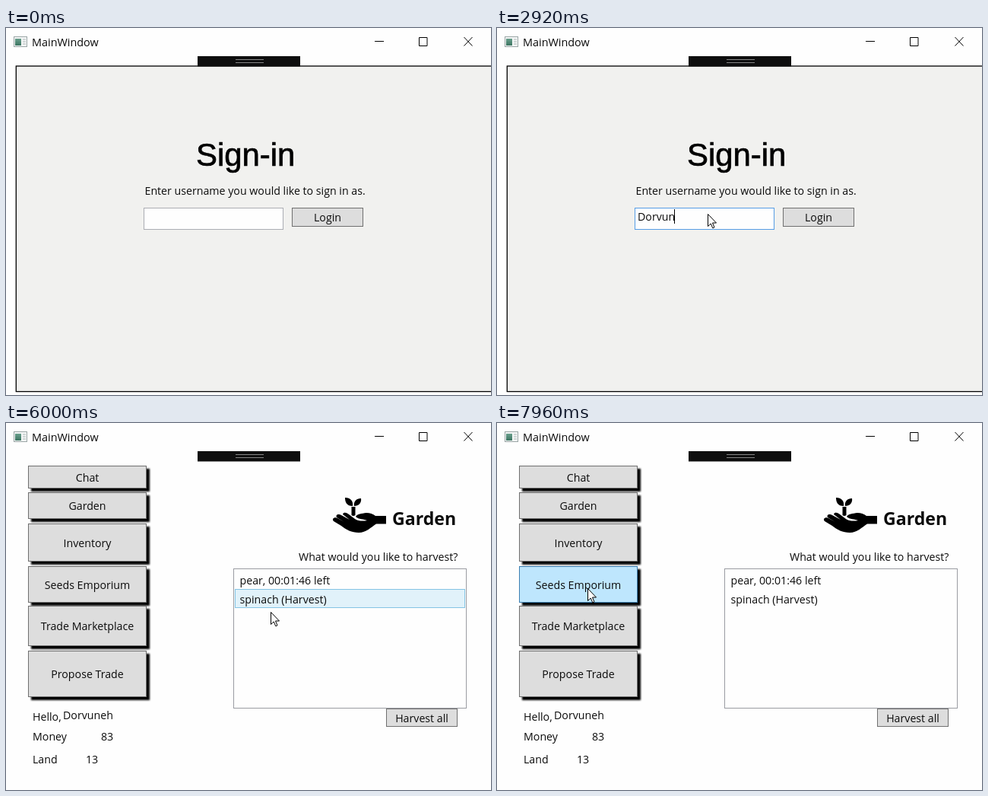
Animation of 638x482 px, one loop 8 s. Source, as an HTML page:

```html
<!DOCTYPE html>
<html lang="en">
<head>
<meta charset="utf-8">
<title>MainWindow</title>
<style>
html, body { margin: 0; width: 100%; height: 100%; overflow: hidden; background: #fefefe; }
svg { display: block; width: 638px; height: 482px; }
text { font: 14.2px "Open Sans", "Noto Sans", sans-serif; fill: #0c0c0c; white-space: pre; }
.mid { text-anchor: middle; }
.button { fill: #ddd; stroke: #707070; }
.button.hover { fill: #bee6fd; stroke: #3c7fb1; }
.row { fill: none; }
.row.hover { fill: #e1f2fa; stroke: #84c4e4; }
</style>
</head>
<body>
<svg viewBox="0 0 638 482">
  <defs>
    <filter id="shadow" x="-10%" y="-20%" width="120%" height="150%">
      <feDropShadow dx="4" dy="4" stdDeviation="1.3" flood-color="#000" flood-opacity="1"/>
    </filter>
    <linearGradient id="pane" x2="0" y2="1">
      <stop stop-color="#699f8c"/><stop offset="1" stop-color="#3d7562"/>
    </linearGradient>
  </defs>
  <rect width="638" height="482" fill="#fefefe"/>

  <g id="signIn">
    <rect x="13.3" y="50" width="640" height="427.5" fill="#f1f1ef" stroke="#000" stroke-width="1.3"/>
    <text x="250" y="181" style="font: 41.9px 'Liberation Sans', Arial, sans-serif; fill: #000; stroke: #000; stroke-width: .7">Sign-in</text>
    <text x="182.500" y="219">Enter username you would like to sign in as.</text>
    <rect id="field" x="181.5" y="236.5" width="183" height="28" fill="#fefefe"/>
    <text id="typed" x="185" y="253"></text>
    <path id="caret" d="M0 238V257" stroke="#000"/>
  </g>

  <g id="garden">
    <text x="35" y="391">Hello,</text><text id="userName" x="75" y="389"></text>
    <text x="35" y="417">Money</text><text x="125" y="417">83</text>
    <text x="35" y="447">Land</text><text x="105" y="447">13</text>
    <path d="M486 122H500V132.500H487C480 137 474 144 464 144C455 144 447 140 441 135L431 129C428 126 432 123 436 125L445 130L435 124C433 120 438 119 441 121L452 127L443 120C444 116 449 118 451 120L459 126C463 129 470 129 475 128C471 126 464 127 460 123C462 119 468 119 474 118Q481 118 486 122Z"/>
    <path d="M454.500 110H459.500V121Q457 123 454.500 121ZM456 109C448 109 446 104 446 98C453 98 457 102 456 109ZM458 109C457 103 461 99 467 99C468 105 464 109 458 109Z"/>
    <text x="508" y="134" style="font-size: 23.1px; font-weight: 700">Garden</text>
    <text x="385" y="181">What would you like to harvest?</text>
    <rect x="299.500" y="191.500" width="306" height="183" fill="#fefefe" stroke="#9a9ca2"/>
  </g>

  <g id="title">
    <rect x="10.500" y="11.500" width="17" height="13" fill="#f4f6f6" stroke="#9aa5a5"/>
    <rect x="12" y="14" width="8" height="9" fill="url(#pane)"/>
    <path d="M22 15h4M22 18h4M22 21h4" stroke="#aab5b5"/>
    <text x="34" y="24" style="font-size: 14.4px">MainWindow</text>
    <path d="M485 17.500h12M543.500 12.500h10.500v11h-10.500zM602.500 12l11 11.500m0-11.500l-11 11.500" fill="none" stroke="#000"/>
    <rect x="252" y="37" width="135" height="13.500" fill="#0e0e0e"/>
    <path d="M302 41.500h37M302 45.500h37" stroke="#868686"/>
  </g>

  <path id="arrow" d="M.5 .5V16.500L4.200 13L6.800 18.800L9 17.800L6.500 12H11.500Z" fill="#fefefe" stroke="#000"/>
  <path id="beam" d="M-3.500 -9H-1L0 -8L1 -9H3.500M0 -8V8M-3.500 9H-1L0 8L1 9H3.500" fill="none" stroke="#000"/>
</svg>
<script>
const LOOP = 8000, PAGE_CHANGE = 4520, HOVER_LAG = 60, BLINK = 530;
const USER = "Dorvuneh";
const $ = id => document.getElementById(id);

// Time and number of letters in the field
const typing = [[790, 0], [1640, 1], [1920, 2], [2120, 3], [2640, 4], [2920, 6], [3640, 7], [4160, 8]];

// Time, x, y of the pointer
const pointer = [
  [80, 619, 337], [700, 277, 240], [880, 277, 240], [920, 277, 244], [5120, 277, 244],
  [5640, 340, 232], [5920, 344, 235], [6000, 348, 248],
  [6280, 528, 378], [6440, 528, 378], [6760, 290, 263], [6840, 290, 263],
  [7040, 142, 255], [7200, 134, 258], [7640, 123, 237], [7960, 119, 217]
];

const targets = [];

function addTarget(page, cls, x, y, w, h, label, extra = "") {
  const group = document.createElementNS("http://www.w3.org/2000/svg", "g");
  const row = cls === "row";
  group.innerHTML =
    `<rect class="${cls}" x="${x + .5}" y="${y + .5}" width="${w - 1}" height="${h - 1}" ${extra}/>` +
    `<text class="${row ? "" : "mid"}" x="${row ? x + 6.5 : x + w / 2}" y="${y + h / 2 + (row ? 6.5 : 5.5)}">${label}</text>`;
  $(page).append(group);
  targets.push({ page, x, y, w, h, rect: group.firstChild });
}

addTarget("signIn", "button", 376, 236, 94, 25, "Login");
addTarget("garden", "row", 301, 193, 303, 25, "pear, 00:01:46 left");
addTarget("garden", "row", 301, 218, 303, 25, "spinach (Harvest)");
addTarget("garden", "button", 500, 375, 94, 24, "Harvest all");
[["Chat", 56, 30], ["Garden", 91, 35], ["Inventory", 132, 50], ["Seeds Emporium", 188, 48],
 ["Trade Marketplace", 240, 53], ["Propose Trade", 299, 61]].forEach(([label, y, h]) =>
  addTarget("garden", "button", 29, y, 156, h, label, 'filter="url(#shadow)"'));
$("userName").textContent = USER;

function pointerAt(t) {
  if (t < pointer[0][0]) return [-99, -99];
  const next = pointer.findIndex(p => p[0] > t);
  if (next < 0) return pointer.at(-1).slice(1);
  const [t0, x0, y0] = pointer[next - 1], [t1, x1, y1] = pointer[next];
  const u = (t - t0) / (t1 - t0), s = u * u * (3 - 2 * u);
  return [x0 + (x1 - x0) * s, y0 + (y1 - y0) * s];
}

const inside = ([px, py], { x, y, w, h }) => px >= x && px < x + w && py >= y && py < y + h;
const show = (id, on) => $(id).setAttribute("display", on ? "inline" : "none");

function draw(t) {
  const page = t < PAGE_CHANGE ? "signIn" : "garden";
  show("signIn", page === "signIn");
  show("garden", page === "garden");

  const key = typing.findLast(k => k[0] <= t);
  $("typed").textContent = key ? USER.slice(0, key[1]) : "";
  show("caret", key && (t - key[0]) % (2 * BLINK) < BLINK);
  if (page === "signIn") {
    const width = key && key[1] ? $("typed").getComputedTextLength() : 0;
    $("caret").setAttribute("transform", `translate(${Math.round(185 + width) - .5})`);
  }

  const pos = pointerAt(t), lagged = pointerAt(t - HOVER_LAG);
  const overField = page === "signIn" && inside(pos, { x: 181, y: 236, w: 184, h: 29 });
  $("field").setAttribute("stroke", key || overField ? "#569de5" : "#abadb3");
  for (const target of targets)
    target.rect.classList.toggle("hover", target.page === page && inside(lagged, target));

  const beam = overField && t < 1600;
  show("beam", beam);
  show("arrow", !beam);
  $(beam ? "beam" : "arrow").setAttribute("transform", `translate(${pos.map(Math.round)})`);
}

function frame() {
  draw(performance.now() % LOOP);
  requestAnimationFrame(frame);
}
frame();
</script>
</body>
</html>
```
